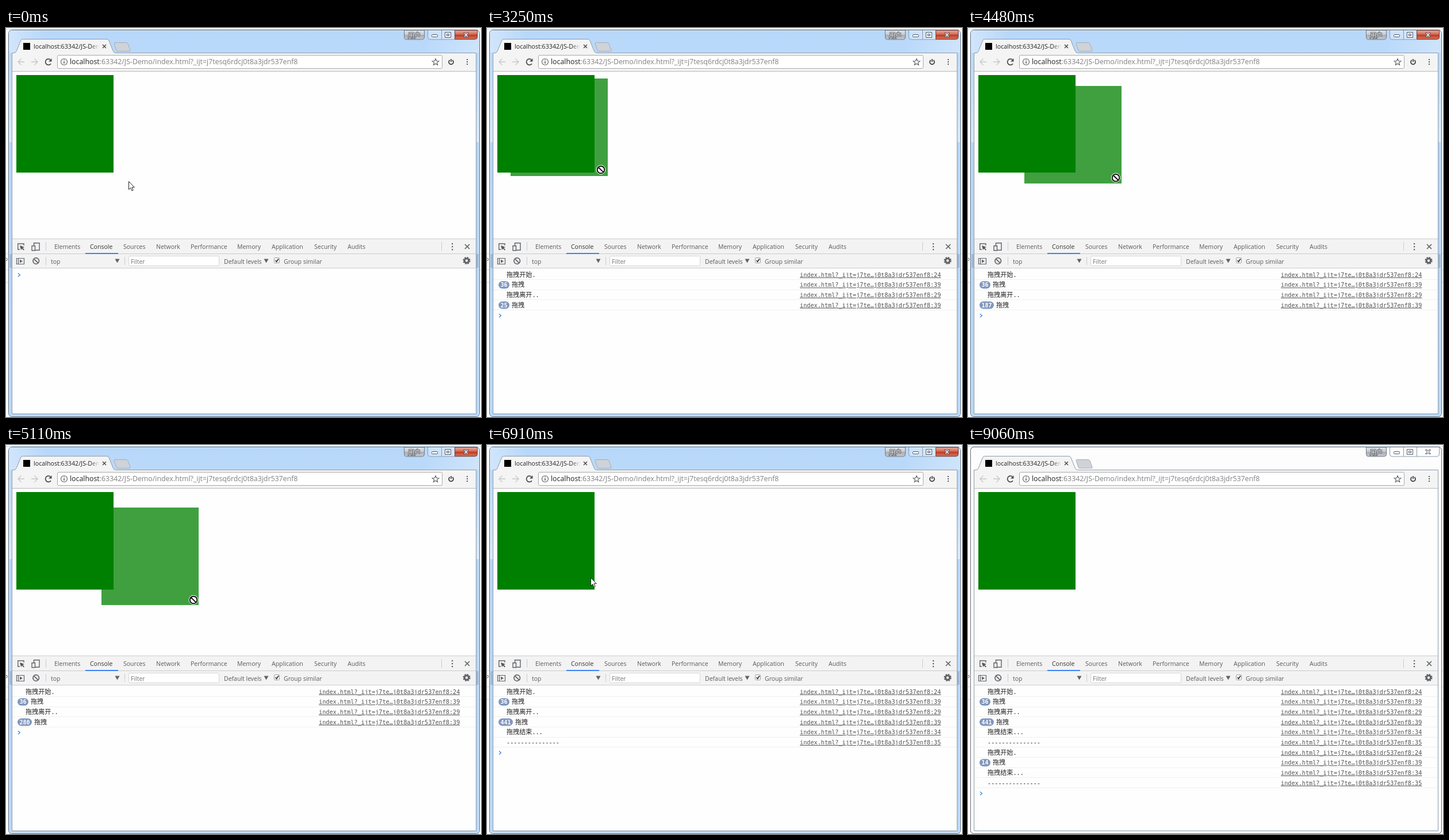
Write an HTML page that moves like this. It is 826 px wide and 678 px high and loops after 9.16 s.

```html
<!DOCTYPE html>
<html lang="zh">
<head>
<meta charset="utf-8">
<title>Drag events</title>
<style>
  html, body { margin: 0; width: 100%; height: 100%; overflow: hidden; background: #fff; }
  svg { display: block; width: 826px; height: 678px; }
  text { font: 10.5px "Open Sans", "Noto Sans", sans-serif; fill: #5a5a5a; white-space: pre; }
  .line { fill: none; stroke: #5f6368; stroke-width: 1.4; }
  .rule { stroke: #ccc; }
  .mono, .mono tspan { font-family: "DejaVu Sans Mono", monospace; font-size: 10.2px; fill: #222; }
  .mono .cjk { font-family: "Noto Sans CJK SC", "Noto Sans CJK", sans-serif; font-size: 11.1px; }
  .link { fill: #545454; text-decoration: underline; }
  .badge { font-weight: bold; font-size: 10px; fill: #fff; }
</style>
</head>
<body>
<svg viewBox="0 0 826 678" xmlns="http://www.w3.org/2000/svg">
  <defs>
    <linearGradient id="glass" x2="0" y2="1">
      <stop offset="0" stop-color="#b7d7fa"/><stop offset=".1" stop-color="#bddbfa"/>
      <stop offset=".29" stop-color="#d9e9fa"/><stop offset=".29" stop-color="#b5d5f7"/>
      <stop offset="1" stop-color="#b9d8f8"/>
    </linearGradient>
    <linearGradient id="glow">
      <stop offset="0" stop-color="#fff" stop-opacity=".35"/><stop offset=".08" stop-color="#fff" stop-opacity="0"/>
      <stop offset=".88" stop-color="#fff" stop-opacity="0"/><stop offset="1" stop-color="#fff" stop-opacity=".3"/>
    </linearGradient>
    <linearGradient id="red" x2="0" y2="1">
      <stop offset="0" stop-color="#e6aea2"/><stop offset=".48" stop-color="#d0644f"/>
      <stop offset=".5" stop-color="#bd3520"/><stop offset="1" stop-color="#d9765a"/>
    </linearGradient>
    <linearGradient id="steel" x2="0" y2="1">
      <stop offset="0" stop-color="#e4e7ea"/><stop offset=".5" stop-color="#c3c8ce"/>
      <stop offset=".5" stop-color="#a4abb3"/><stop offset="1" stop-color="#c6cbd0"/>
    </linearGradient>
    <linearGradient id="fade" gradientUnits="userSpaceOnUse" x1="147" x2="162" y1="0" y2="0">
      <stop stop-color="#222"/><stop offset="1" stop-color="#222" stop-opacity="0"/>
    </linearGradient>
    <clipPath id="page"><rect x="11" y="76" width="806" height="291"/></clipPath>
  </defs>

  <!-- desktop -->
  <rect width="826" height="678" fill="#fff"/>
  <path d="M0 2.5H826M0 393.5H826" stroke="#c9dcef"/>
  <path d="M0 421.5H826M0 443.5H826" stroke="#dedede"/>
  <text x="-3" y="409">P</text>

  <!-- window frame -->
  <rect x="4.5" y="3.5" width="819" height="674" rx="6" fill="url(#glass)" stroke="#51677f"/>
  <rect x="5" y="4" width="818" height="40" rx="5" fill="url(#glow)"/>
  <rect x="5.5" y="4.5" width="817" height="672" rx="5" fill="none" stroke="#e3f0fd" stroke-opacity=".8"/>
  <path d="M6 394h4v24h-4zM818 394h4v24h-4z" fill="#9db9d8"/>
  <rect id="idle" x="4.5" y="3.5" width="819" height="674" rx="6" fill="#fdfdfd" stroke="#6d6d6d" opacity="0"/>
  <path d="M692.5 4V16q0 4 4 4h27q4 0 4-4V4z" fill="url(#steel)" stroke="#727a84"/>
  <text x="699" y="16.5" style="font:11px 'Noto Sans CJK SC','Noto Sans CJK',sans-serif;fill:#fff;stroke:#4a4f55;stroke-width:1.6;paint-order:stroke">用户</text>
  <path d="M733.5 4V16q0 4 4 4h78q4 0 4-4V4" fill="#fff" fill-opacity=".25" stroke="#8c9aaa"/>
  <path d="M757.5 4V20M780.5 4V20" stroke="#8c9aaa"/>
  <path id="close" d="M780.5 4V19.5H815.5q4 0 4-4V4z" fill="url(#red)" stroke="#7c3a33"/>
  <g fill="#fff" stroke="#4c5560">
    <rect x="740.5" y="11.5" width="10" height="4" rx="1"/>
    <path fill-rule="evenodd" d="M763.5 7.5h10v9h-10zM766.5 10.5v3h4v-3z"/>
    <path d="M795.5 8.5h3l1.5 2 1.5-2h3l-3 3.5 3 3.5h-3l-1.5-2-1.5 2h-3l3-3.5z"/>
  </g>

  <!-- tab and address bar -->
  <path d="M194 40.5q-1.5 0-2-1.5l-4-11.5q-.5-2 2-2h19q2 0 3 2l4 11q.8 2-1.5 2z" fill="#cfd3d8" stroke="#a3adb8"/>
  <path d="M10.5 43.5H14q3 0 4.5-4L25.5 22q1-2.5 4-2.5H175q3 0 4 2.5l7 17.5q1.5 4 4.5 4H817.5V672.5H10.5z" fill="#f4f4f4" stroke="#8d9aa8"/>
  <rect x="30" y="26" width="12" height="12" fill="#000"/>
  <text x="48" y="36" style="font-size:10.7px;fill:url(#fade)">localhost:63342/JS-Demo</text>
  <path class="line" d="M168 29l6 6M174 29l-6 6" style="stroke:#444"/>
  <path class="line" d="M32 59H21M26.5 53.5L21 59l5.5 5.5M44 59H55M49.5 53.5L55 59l-5.5 5.5" style="stroke:#c8c8c8"/>
  <path class="line" d="M78 62.2A5.2 5.2 0 1 1 77.3 55.3" style="stroke:#4d4d4d;stroke-width:1.8"/>
  <path d="M79.5 53v5.5H74z" fill="#4d4d4d"/>
  <rect x="89.5" y="47.5" width="669" height="23" rx="2" fill="#fff" stroke="#a8a8a8"/>
  <circle class="line" cx="101" cy="59" r="5.5" style="stroke-width:1.2"/>
  <path d="M101 58v4M101 55v1.5" stroke="#555" stroke-width="1.5"/>
  <text x="111" y="63.3" style="font-size:12.35px;fill:#808080"><tspan fill="#222">localhost</tspan>:63342/JS-Demo/index.html?_ijt=j7tesq6rdcj0t8a3jdr537enf8</text>
  <path class="line" d="M747 53.5l1.6 4 4.2.2-3.3 2.7 1.1 4.1-3.6-2.3-3.6 2.3 1.1-4.1-3.3-2.7 4.2-.2z" style="stroke-width:1.2"/>
  <path class="line" d="M771.8 56A4 4 0 1 0 776.2 56M774 54v5" style="stroke:#333;stroke-width:1.6"/>
  <path d="M801 54h2v2h-2zM801 58h2v2h-2zM801 62h2v2h-2z" fill="#555"/>

  <!-- page -->
  <rect x="11" y="76" width="806" height="596" fill="#fefefe"/>
  <path d="M11 75.5H817" stroke="#b8b8b8"/>
  <rect x="18" y="82" width="169" height="170" fill="green"/>
  <g clip-path="url(#page)"><rect id="ghost" x="18" y="82" width="169" height="170" fill="green" opacity=".75"/></g>

  <!-- developer tools -->
  <rect x="11" y="368" width="806" height="50" fill="#f3f3f3"/>
  <path class="rule" d="M11 367.5H817M11 393.5H817M11 418.5H817M69.5 373V388M757.5 373V388M69.5 399V413M206.5 399V413"/>
  <path d="M138 393H195" stroke="#3b82f6" stroke-width="2"/>
  <path class="line" d="M24 386H20.7V376H31V379"/>
  <path d="M24 379l8 3-3 1.3 3 3-1.3 1.3-3-3-1.5 2.4z" fill="#555"/>
  <path class="line" d="M48.5 379V374.7H58V387.3H51M45 379.7h5.5v8H45z"/>
  <g id="tabs"></g>
  <path d="M775 375h2.2v2.2H775zM775 380h2.2v2.2H775zM775 385h2.2v2.2H775z" fill="#5f6368"/>
  <path class="line" d="M798 377l8 8M806 377l-8 8" style="stroke-width:1.7"/>
  <path class="line" d="M18.5 401.5H31.5V411.5H18.5zM21.5 401.5V411.5" style="stroke-width:1.2"/>
  <path d="M24 403.5l5 3-5 3z" fill="#5f6368"/>
  <path class="line" d="M57.5 406a5.3 5.3 0 1 1-10.6 0a5.3 5.3 0 1 1 10.6 0M48.5 402.3l7.5 7.5" style="stroke-width:1.7"/>
  <text x="78" y="410.5">top</text>
  <path d="M189.5 402.5h8l-4 7zM448.5 402.5h8l-4 7z" fill="#5f6368"/>
  <rect x="213.5" y="397.5" width="157" height="17" rx="2" fill="#fff" stroke="#d5d5d5"/>
  <text x="217" y="411" style="fill:#757575">Filter</text>
  <text x="379" y="410.5">Default levels</text>
  <rect x="466.5" y="400.5" width="9" height="9" rx="1" fill="#fff" stroke="#999"/>
  <path d="M468.5 405l2 2.3 3.5-5" fill="none" stroke="#333" stroke-width="1.7"/>
  <text x="483" y="410.5">Group similar</text>
  <circle cx="801" cy="405.5" r="3.7" fill="none" stroke="#5f6368" stroke-width="3"/>
  <circle cx="801" cy="405.5" r="5.7" fill="none" stroke="#5f6368" stroke-width="1.8" stroke-dasharray="2.6 1.877"/>
  <g id="log"></g>
  <path id="prompt" d="M21 427.5l3.3 3-3.3 3" fill="none" stroke="#4a90e2" stroke-width="1.5"/>

  <!-- pointer -->
  <g id="ring" fill="none">
    <circle cx="1" cy="1" r="8.5" stroke="#000"/><circle cx="1" cy="1" r="7.5" stroke="#fff"/>
  </g>
  <path id="arrow" d="M.5.5V14.5L3.7 11.5 6 16.7 8.2 15.7 6 10.7H10.3z" fill="#fff" stroke="#222"/>
  <g id="forbid" fill="none">
    <circle r="6.3" stroke="#fff" stroke-width="4" fill="#fff"/>
    <path d="M6.3 0A6.3 6.3 0 1 1-6.3 0A6.3 6.3 0 1 1 6.3 0M-4.4-4.4L4.4 4.4" stroke="#111" stroke-width="2"/>
  </g>
</svg>
<script>
const LOOP = 9160, ROW = 17.67;
const $ = id => document.getElementById(id);
const show = (id, on) => $(id).setAttribute('visibility', on ? 'visible' : 'hidden');
const place = (id, x, y) => $(id).setAttribute('transform', `translate(${Math.round(x)} ${Math.round(y)})`);

$('tabs').innerHTML = Object.entries({
  Elements: 84, Console: 146, Sources: 204, Network: 261, Performance: 321,
  Memory: 402, Application: 462, Security: 536, Audits: 594
}).map(([name, x]) => `<text x="${x}" y="385"${name === 'Console' ? ' style="fill:#333"' : ''}>${name}</text>`).join('');

// time, x, y, and for drags the number of drag events
const drag = [
  [2300, 2, 2, 1], [2700, 5, 3, 18], [3059, 13, 4, 36], [3060, 13, 4, 37],
  [3250, 23, 6, 61], [3289, 23, 6, 61], [4150, 61, 14, 180],
  [4480, 80, 19, 223], [4509, 80, 19, 223], [5080, 147, 27, 312],
  [5500, 166, 29, 374], [6020, 177, 30, 452], [6179, 177, 30, 476],
  [6209, 177, 30, 476], [6210, 177, 30, 477]
];
const redrag = [[7300, 0, 0, 1], [7430, -2, -3, 14]];
const moves = [
  [1170, 213, 267], [1570, 173, 240], [6180, 173, 240], [6180, 350, 270],
  [6420, 350, 270], [6940, 178, 231], [7300, 178, 231], [7430, 176, 228], [7700, 803, 592]
];
const smooth = u => u * u * (3 - 2 * u);

function at(track, t, ease = u => u) {
  const i = track.findIndex(p => p[0] > t);
  if (i === 0) return track[0];
  if (i < 0) return track[track.length - 1];
  const a = track[i - 1], b = track[i], u = ease((t - a[0]) / (b[0] - a[0]));
  return a.map((v, k) => v + (b[k] - v) * u);
}

function logRows(t) {
  const first = Math.floor(at(drag, t)[3]), second = Math.floor(at(redrag, t)[3]);
  const end = [['拖拽结束...', 34], ['-'.repeat(15), 35]];
  const rows = [];
  if (t >= 2300) rows.push(['拖拽开始.', 24], ['拖拽', 39, Math.min(first, 36)]);
  if (t >= 3060) rows.push(['拖拽离开..', 29], ['拖拽', 39, first - 36]);
  if (t >= 6250) rows.push(...end);
  if (t >= 7300) rows.push(['拖拽开始.', 24], ['拖拽', 39, second]);
  if (t >= 7430) rows.push(...end);
  return rows;
}

function rowMarkup([text, line, count = 1], i) {
  const y = 430 + i * ROW, base = y + 3.7;
  const width = 7 + 6 * String(count).length;
  const badge = count > 1
    ? `<rect x="20" y="${y - 6.5}" width="${width}" height="13" rx="6.5" fill="#8097bd"/>
       <text class="mono badge" text-anchor="middle" x="${20 + width / 2}" y="${base}">${count}</text>` : '';
  const label = text.replace(/[^.-]+/, '<tspan class="cjk">$&</tspan>');
  return `${badge}<text class="mono" x="${count > 1 ? 24 + width : 34}" y="${base}">${label}</text>
    <text class="mono link" x="544" y="${base}">index.html?_ijt=j7te…j0t8a3jdr537enf8:${line}</text>
    <path d="M11 ${Math.round(y + 8) + .5}H817" stroke="#f0f0f0"/>`;
}

let shown = '';
function draw(t) {
  const within = (a, b) => t >= a && t < b;
  const dragging = within(2300, 6210), again = within(7300, 7430);
  const [, dx, dy] = at(again ? redrag : drag, t);
  const [, px, py] = at(moves, t, smooth);
  const forbidden = within(2300, 6180) || again;

  show('ghost', dragging || again);
  place('ghost', dx, dy);
  show('forbid', forbidden);
  if (again) place('forbid', px + 1, py + 1);
  else place('forbid', 175 + dx * 1.02, 240.6 + dy * 1.07);
  show('arrow', !forbidden && t < 7700);
  place('arrow', px, py);
  show('ring', within(780, 920) || within(2090, 2300) || within(7220, 7300));
  place('ring', px + 1, py + 1);

  const rows = logRows(t), markup = rows.map(rowMarkup).join('');
  if (markup !== shown) $('log').innerHTML = shown = markup;
  $('prompt').setAttribute('transform', `translate(0 ${rows.length * ROW})`);

  const idle = t >= 9060 ? 1 : t >= 9010 ? .5 : 0;
  $('idle').setAttribute('opacity', idle);
  $('close').setAttribute('opacity', 1 - idle);
}

const start = performance.now();
function tick() {
  draw((performance.now() - start) % LOOP);
  requestAnimationFrame(tick);
}
tick();
</script>
</body>
</html>
```
